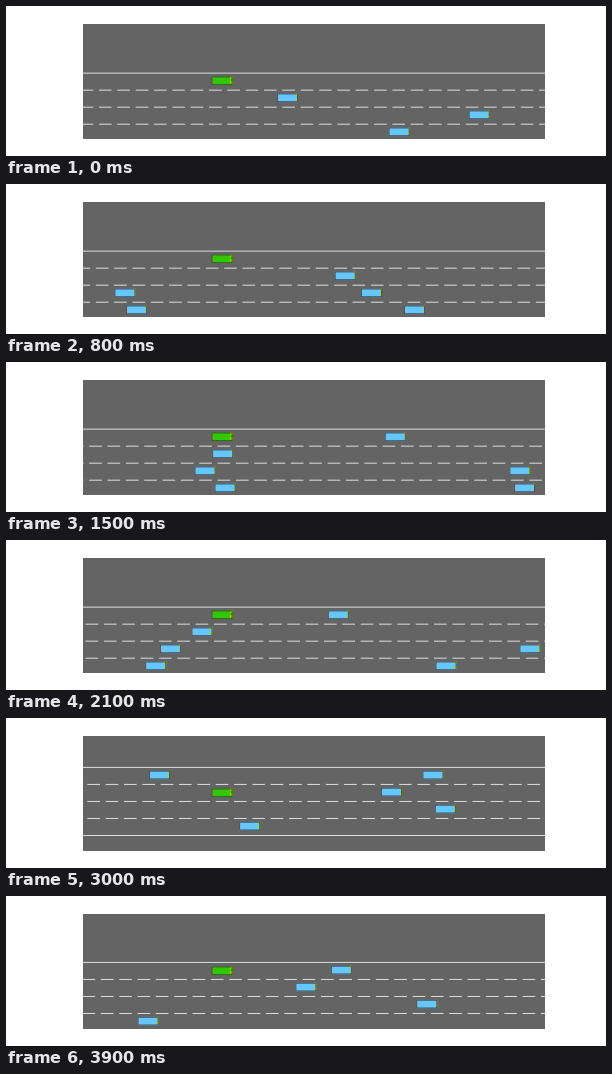
Animation of 600 by 150 pixels, one loop 4000 ms. Source, as an HTML page with a canvas:

```html
<!DOCTYPE html>
<html lang="en">
<head>
<meta charset="utf-8">
<title>Highway</title>
<style>
  html, body { margin: 0; width: 100%; height: 100%; overflow: hidden; background: #fff; }
  canvas { display: block; }
</style>
</head>
<body>
<canvas id="stage" width="600" height="150"></canvas>
<script>
const ctx = document.getElementById('stage').getContext('2d');

const STEP = 100, STEPS = 40;              // ms per pose, poses per loop
const ROAD = [77, 18, 462, 115];           // road view on the stage
const VIEW_W = 600, METRE = 5.5;           // view units
const LANE = 22, ROAD_TOP = 63;
const STRIPE = 3 * METRE, SPACING = 4.33 * METRE;
const CAR_W = 27, CAR_H = 11, CAR_TOP = 68, OWN_X = 167;

// Own speed in metres per step; each change settles with a short lag.
const FAST = 29.7, SLOW = 24.66, SPEED_LAG = 0.6;
const BRAKE = 13, SPEED_UP = 23.1, BRAKE_AGAIN = 27.1;
const MERGE = 22, RETURN = 31, MERGE_LAG = 0.7;

const settle = (t, lag) => t > 0 ? 1 - Math.exp(-t / lag) : 0;

// Distance gained per unit of speed changed t steps ago.
const gain = t => Math.max(t, 0) - SPEED_LAG * settle(t, SPEED_LAG);

function driven(n) {
  const slowed = gain(n - BRAKE) - gain(n - SPEED_UP) + gain(n - BRAKE_AGAIN);
  return FAST * n + 1.3 * settle(n, SPEED_LAG) - (FAST - SLOW) * slowed;
}

// Scroll across the lanes: out one lane and back, with a slight drift.
function sideways(n) {
  const merged = settle(n - MERGE, MERGE_LAG) - settle(n - RETURN, MERGE_LAG);
  return -Math.round(LANE * merged + n / 45);
}

// Each car: metres ahead of the own car at one step, then its own motion.
function car(lane, step, ahead, speed, accel = 0, jerk = 0) {
  const start = driven(step) + ahead;
  return {
    lane,
    position(n) {
      const t = n - step;
      return start + speed * t + accel * t ** 2 / 2 + jerk * t ** 3 / 6;
    },
  };
}

const traffic = [
  car(3, 0, 41.9, 22.1),
  car(2, 0, 60.8, 19.4),
  car(1, 0, 15.5, 22),
  car(1, 15, 0.1, 24.4, -0.11, -0.031),
  car(2, 15, -4, 23.2, 0.04),
  car(3, 15, 0.8, 22.1, -0.055),
  car(0, 21, 27.5, 22.35, -0.03),
  car(2, 25, 66.7, 24.7, -0.055),
  car(3, 25, 34.3, 21.75, 0.025),
  car(0, 30, 49.9, 22, 0.055),
  car(1, 30, 40, 22.2, 0.05),
];

function box(color, x, y, w, h) {
  ctx.fillStyle = color;
  ctx.fillRect(x, y, w, h);
}

function drawCar(color, x, y) {
  box(color, x, y, CAR_W, CAR_H);
  for (const dy of [0, 6]) box('#c8c800', x + CAR_W - 3, y + dy, 3, 3);
  ctx.strokeStyle = '#3c3c3c';
  ctx.strokeRect(x + 0.5, y + 0.5, CAR_W - 1, CAR_H - 1);
}

function drawLines(distance, shift) {
  const firstStripe = (20.7 - distance * METRE) % SPACING - SPACING;
  for (let i = 0; i <= 4; i++) {
    const y = ROAD_TOP + i * LANE + shift;
    if (i % 4 === 0) box('#fff', 0, y, VIEW_W, 1);
    else for (let x = firstStripe; x < VIEW_W; x += SPACING) box('#fff', x, y, STRIPE, 1);
  }
}

function draw(n) {
  const distance = driven(n), shift = sideways(n);

  ctx.clearRect(0, 0, 600, 150);
  ctx.save();
  ctx.beginPath();
  ctx.rect(...ROAD);
  ctx.clip();
  box('#646464', ...ROAD);
  ctx.translate(ROAD[0], ROAD[1]);
  ctx.scale(462 / 600, 116 / 150);

  drawLines(distance, shift);
  for (const { lane, position } of traffic) {
    const x = OWN_X + Math.round((position(n) - distance) * METRE);
    drawCar('#64c8ff', x, CAR_TOP + lane * LANE + shift);
  }
  drawCar('#32c800', OWN_X, CAR_TOP);
  ctx.restore();
}

function tick() {
  draw(Math.floor(performance.now() / STEP) % STEPS);
  requestAnimationFrame(tick);
}
tick();
</script>
</body>
</html>
```
